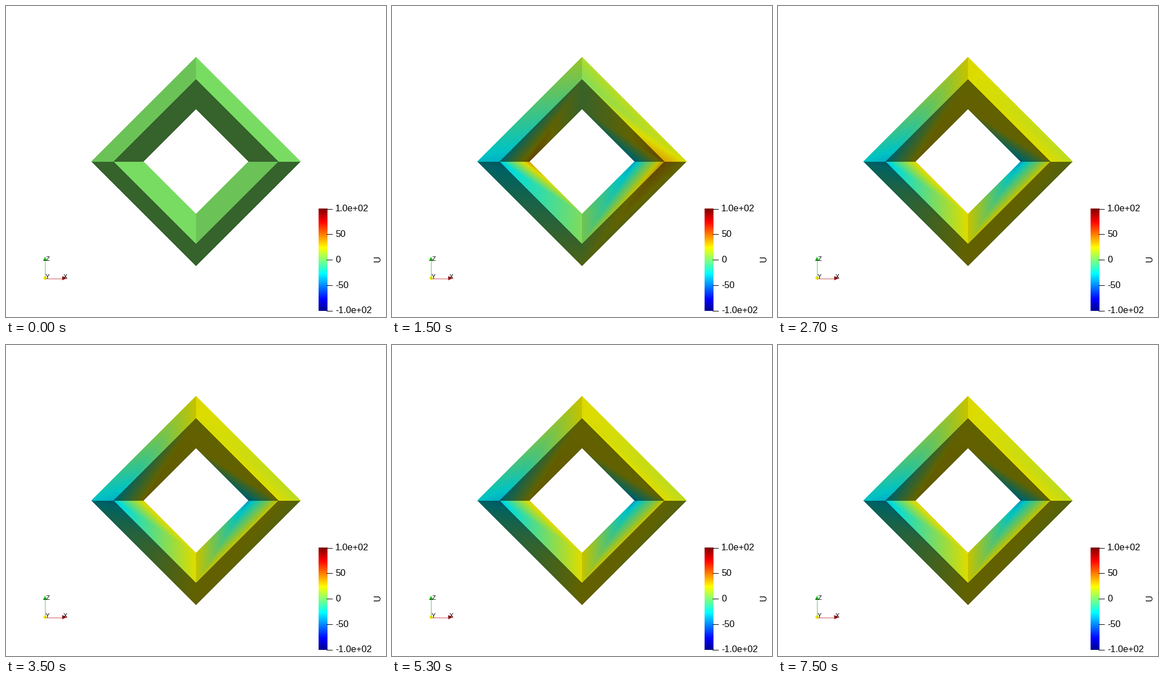
These frames come from a looping animation (682x559 px, 7600 ms). A matplotlib script:

```python
import matplotlib.pyplot as plt
import numpy as np
from matplotlib.animation import FuncAnimation

W, H, DPI = 682, 559, 64
FRAMES, STEP = 76, 100

# Jet colour map over -100..100
STOPS = [-100, -77.8, -27, -1.6, 23.8, 74.6, 100]
RED = [0, 0, 0, 0.5, 1, 1, 0.5]
GREEN = [0, 0, 1, 1, 1, 0, 0]
BLUE = [0.56, 1, 1, 0.5, 0, 0, 0]


def jet(u):
    return np.stack([np.interp(u, STOPS, c) for c in (RED, GREEN, BLUE)], axis=-1)


# Field at the corners of the rings: (top and bottom, right, left)
TIMES = [0, 800, 1500, 2500]
OUTER = [(1, 1, 1), (1, 29, -26), (13, 22, -30), (25, 16, -28)]
MIDDLE = [(1, 1, 1), (1, 18, -15), (3, 38, -32), (24, 24, -33)]
INNER = [(1, 1, 1), (1, -15, 15), (2, -36, 40), (25, -38, 28)]

# Diamond geometry: taxicab distance from the centre picks the ring
CX, CY = 341, 279.5
R_IN, R_MID, R_OUT = 94, 148, 188
ys, xs = np.mgrid[0:H, 0:W] + 0.5
dx, dy = xs - CX, ys - CY
dist = abs(dx) + abs(dy)
solid = (dist > R_IN) & (dist < R_OUT)
dx, dy, dist = dx[solid], dy[solid], dist[solid]
right, upper, outside = dx > 0, dy <= 0, dist > R_MID

DARK, SOFT, LIT = 0.385, 0.768, 0.865
shade = np.where(outside == upper,
                 np.where(right == upper, LIT, SOFT), DARK)[:, None]

# Each face is two triangles, split from its far start to its near end,
# with start and end taken anticlockwise
from_tip = right == upper
p = np.where(from_tip, abs(dx), abs(dy))
q = np.where(from_tip, abs(dy), abs(dx))
far = np.where(outside, R_OUT, R_MID)
near = np.where(outside, R_MID, R_IN)
rise = (dist - near) / (far - near)
in_near = 1 - q / near - rise >= 0
far_start = np.where(in_near, rise, p / far)
far_end = np.where(in_near, 0, rise - p / far)
near_end = np.where(in_near, q / near, 1 - rise)
near_start = 1 - far_start - far_end - near_end


def corners(keys, t):
    """Values at the start and end corner of each pixel's side."""
    top, east, west = (np.interp(t, TIMES, k) for k in zip(*keys))
    tip = np.where(right, east, west)
    return np.where(from_tip, tip, top), np.where(from_tip, top, tip)


def field(t):
    outer, middle, inner = (corners(k, t) for k in (OUTER, MIDDLE, INNER))
    f0, f1 = np.where(outside, outer, middle)
    n0, n1 = np.where(outside, middle, inner)
    return f0 * far_start + f1 * far_end + n0 * near_start + n1 * near_end


fig = plt.figure(figsize=(W / DPI, H / DPI), dpi=DPI, facecolor="white")
ax = fig.add_axes([0, 0, 1, 1])
ax.axis("off")
canvas = np.ones((H, W, 3))
image = ax.imshow(canvas, extent=(0, W, H, 0), interpolation="nearest",
                  aspect="auto")


def px(size):
    return size * 72 / DPI


def label(x, y, text, size=16.5, **kw):
    ax.text(x, y, text, fontsize=px(size), family="Liberation Sans",
            color="black", va="center_baseline", **kw)


def line(x, y, color, width=1):
    ax.plot(x, y, color=color, lw=px(width), solid_capstyle="butt")


def shape(points, color):
    ax.add_patch(plt.Polygon(points, facecolor=color, lw=0))


# Colour bar
bar = jet(np.linspace(100, -100, 256))[:, None]
ax.imshow(bar, extent=(561, 577, 548, 364), interpolation="nearest",
          aspect="auto")
for y, text in zip(np.linspace(364.5, 547.5, 5),
                   ("1.0e+02", "50", "0", "-50", "-1.0e+02")):
    line([575, 586], [y, y], "black")
    label(591, y - 1.2, text)
ax.text(667.5, 454, "U", fontsize=px(15.5), family="Liberation Sans",
        rotation=90, ha="center", va="center")

# Orientation axes
line([70, 102], [489.5, 489.5], "#c85a5a")
line([69.5, 69.5], [489, 457], "#6cc46c")
shape([(101, 485.5), (109.5, 489.2), (101, 493)], "#d40000")
shape([(101, 485.5), (103, 489.2), (101, 493)], "#400000")
shape([(66.5, 458), (70, 450.5), (73.5, 458)], "#10c810")
shape([(66.5, 458), (70, 456), (73.5, 458)], "#004000")
ax.add_patch(plt.Circle((70, 489), 3, facecolor="#f0f000", lw=0))
label(106.5, 485.5, "X", 11, ha="center")
label(74.5, 486.5, "Y", 11, ha="center")
label(75, 454.5, "Z", 11, ha="center")

ax.set_xlim(0, W)
ax.set_ylim(H, 0)


def draw(i):
    canvas[solid] = jet(field(i * STEP)) * shade
    image.set_data(canvas)
    return [image]


anim = FuncAnimation(fig, draw, frames=FRAMES, interval=STEP, repeat=True,
                     repeat_delay=0, blit=False)
plt.show()
```
